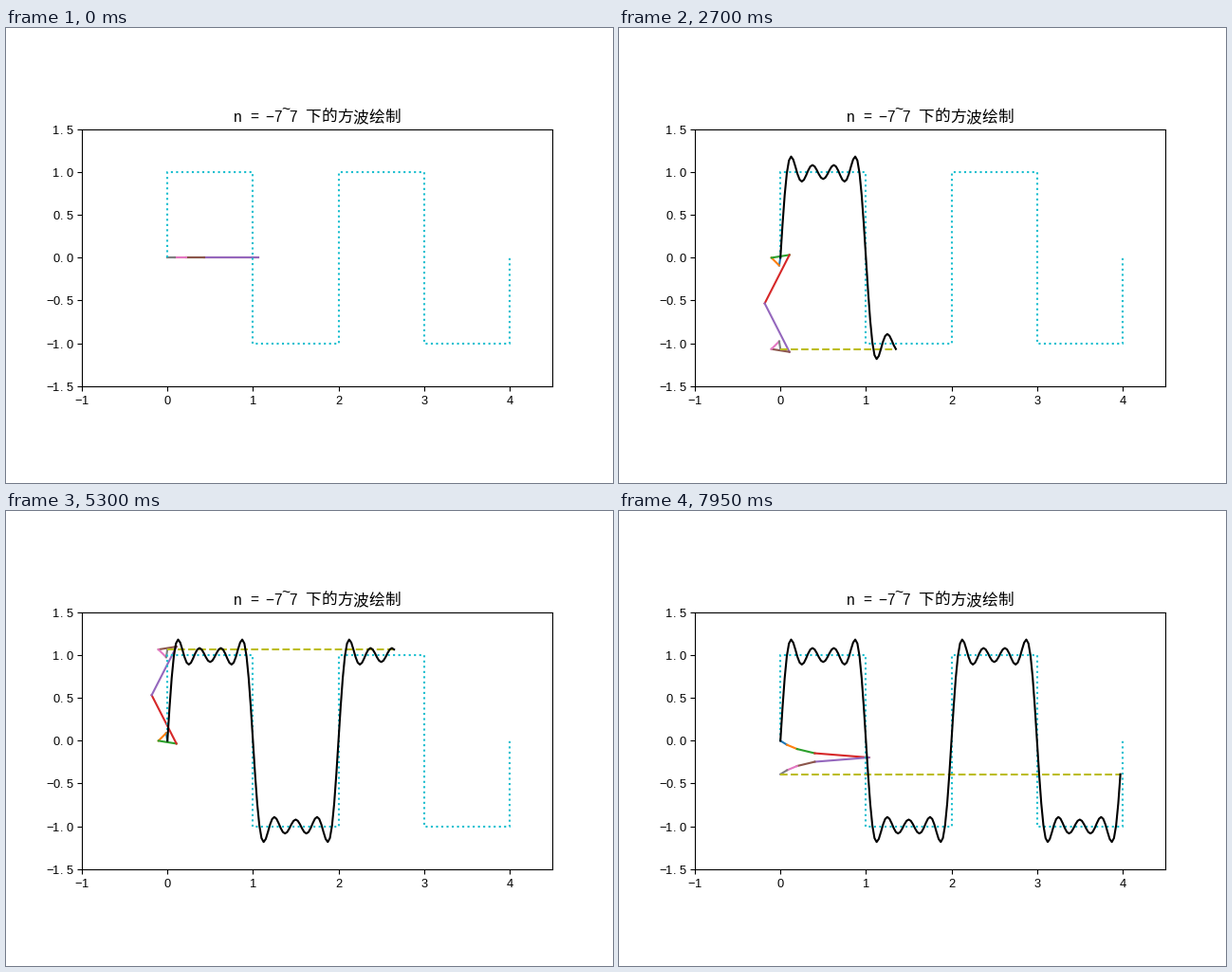
These frames come from a looping animation (640x480 px, 8000 ms). A matplotlib script:

```python
import numpy as np
import matplotlib.pyplot as plt
from matplotlib.animation import FuncAnimation

W, H, DPI = 640, 480, 100
FRAMES, INTERVAL = 160, 50
ORDERS = np.arange(-7, 8, 2)
TIMES = np.arange(FRAMES) * 0.025
LATIN = ["Liberation Sans", "Noto Sans CJK JP"]
CJK = ["Noto Sans CJK JP"]

fig, ax = plt.subplots(figsize=(W / DPI, H / DPI), dpi=DPI)
ax.set_aspect("equal")
ax.set_xlim(-1, 4.5)
ax.set_ylim(-1.5, 1.5)
ax.set_xticks(range(-1, 5))
ax.set_yticks(np.arange(-1.5, 1.6, 0.5))
ax.tick_params(labelbottom=False, labelleft=False)
fig.canvas.draw()


def to_px(x, y):
    px, py = ax.transData.transform((x, y))
    return px, H - py


def fixed_pitch(x, y, text, size, align):
    """Set text on a half-em grid (full em for CJK), y is the baseline."""
    em = size * DPI / 72
    cells = [em if ord(c) > 0x2FFF else em / 2 for c in text]
    x -= sum(cells) * align
    for c, cell in zip(text, cells):
        wide = cell == em
        dx = -0.12 * em if c == "." else 0
        dy = 0.4 * em if c == "~" else 0
        if c != " ":
            fig.text((x + cell / 2 + dx) / W, 1 - (y - dy) / H, c,
                     size=size if wide else size * 0.93,
                     family=CJK if wide else LATIN,
                     ha="center", va="baseline")
        x += cell


def minus(text):
    return text.replace("-", "\u2212")


for v in ax.get_xticks():
    fixed_pitch(to_px(v, 0)[0], 397, minus(f"{v:.0f}"), 10, 0.5)
for v in ax.get_yticks():
    fixed_pitch(70.3, to_px(0, v)[1] + 5, minus(f"{v:.1f}"), 10, 1)
fixed_pitch(328, 98.8, minus("n = -7~7 下的方波绘制"), 12, 0.5)


def joints(t):
    """Ends of the chained rotating vectors, starting at the origin."""
    size = 2 / (np.pi * ORDERS)
    angle = np.pi * ORDERS * t
    x = np.cumsum(-size * np.cos(angle))
    y = np.cumsum(size * np.sin(angle))
    return np.r_[0, x], np.r_[0, y]


wave = np.array([joints(t)[1][-1] for t in TIMES])

links = [ax.plot([], [], color=f"C{i}")[0] for i in range(len(ORDERS))]
guide, = ax.plot([], [], "--", color="C8")
ax.plot([0, 0, 1, 1, 2, 2, 3, 3, 4, 4],
        [0, 1, 1, -1, -1, 1, 1, -1, -1, 0], ":", color="C9")
trace, = ax.plot([], [], color="k")


def update(i):
    x, y = joints(TIMES[i])
    for k, link in enumerate(links):
        link.set_data(x[k:k + 2], y[k:k + 2])
    guide.set_data([x[-1], TIMES[i]], [y[-1], y[-1]])
    trace.set_data(TIMES[:i + 1], wave[:i + 1])
    return [*links, guide, trace]


anim = FuncAnimation(fig, update, frames=FRAMES, interval=INTERVAL,
                     repeat=True, repeat_delay=0, blit=False)
plt.show()
```
